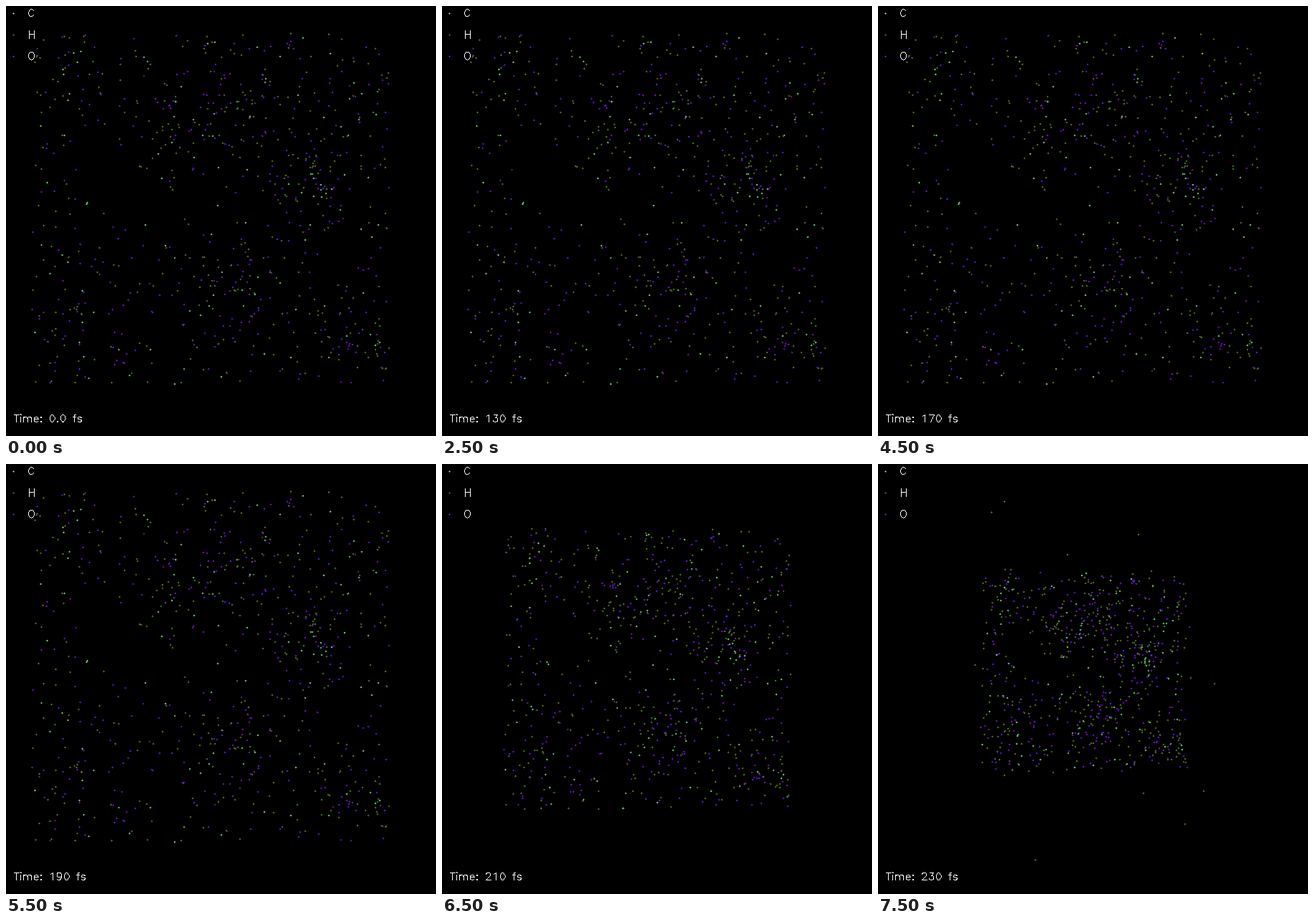
Animation of 600x600 px, one loop 8000 ms. Source, as a matplotlib script:

```python
import numpy as np
import matplotlib.pyplot as plt
from matplotlib.animation import FuncAnimation

SIZE, FRAMES, STEP = 600, 16, 500
ATOMS = 800
CENTER = np.array([293, 299])
CARBON, HYDROGEN, OXYGEN = (118, 240, 128), (96, 140, 20), (126, 24, 244)

# Motion from the 200 fs mark on; before it everything rests
FALL = 12
SCALE = (0.98, 0.80, 0.607, 0.565)
DRIFT = (0.4, 2.5, 4.5, 6)
ESCAPE = (0, 0.4, 0.95, 1)

CLUMPS = [(325, 140, 28), (210, 175, 32), (430, 245, 28), (300, 365, 40), (490, 460, 32)]
VOIDS = [(140, 220, 45), (310, 290, 38), (215, 290, 40), (220, 450, 30), (470, 345, 32)]
EXITS = [(176, 52), (158, 67), (264, 126), (363, 98), (135, 280), (469, 306),
         (454, 456), (428, 502), (370, 459), (219, 552)]

rng = np.random.default_rng(12)


def bump(p, x, y, r):
    return np.exp(-((p - (x, y)) ** 2).sum(axis=1) / (2 * r * r))


def scatter_atoms():
    """Pick points of the box by a density with clumps and voids."""
    p = rng.uniform((36, 37), (534, 528), (8000, 2))
    density = 0.8 + 1.8 * sum(bump(p, *c) for c in CLUMPS)
    for v in VOIDS:
        density *= 1 - 0.95 * bump(p, *v)
    return p[rng.choice(len(p), ATOMS, replace=False, p=density / density.sum())]


home = scatter_atoms()
wander = rng.normal(size=home.shape)
kinds = rng.choice(3, ATOMS, p=(0.14, 0.44, 0.42))
kinds[:len(EXITS)] = 1
colors = np.array([CARBON, HYDROGEN, OXYGEN])[kinds] * rng.uniform(0.85, 1, (ATOMS, 1))


def positions(k):
    if k < FALL:
        return home
    i = k - FALL
    p = CENTER + SCALE[i] * (home - CENTER) + DRIFT[i] * wander
    n = len(EXITS)
    p[:n] += ESCAPE[i] * (EXITS - p[:n])
    return p


def stamp(img, pts, rgb):
    """Put a 3 px plus with a brighter middle at every point."""
    x, y = np.rint(pts).astype(int).T
    for dx, dy in ((1, 0), (-1, 0), (0, 1), (0, -1)):
        img[y + dy, x + dx] = np.multiply(rgb, 0.7)
    img[y, x] = rgb


# Single-stroke lettering: baseline at 0, capitals 21 units high
def arc(cx, cy, rx, ry, start=0, end=360):
    t = np.radians(np.linspace(start, end, 17))
    return list(zip(cx + rx * np.cos(t), cy + ry * np.sin(t)))


def stem(x, top):
    return [(x, top), (x, 0)]


def bar(x0, x1, y):
    return [(x0, y), (x1, y)]


def dot(y, x=5):
    return arc(x, y, 1, 1)


def flip(strokes):
    return [[(20 - x, 21 - y) for x, y in s] for s in strokes]


RING = arc(10, 10.5, 7, 10.5)
BOWL = arc(10, 6.5, 7, 6.5, 85, -155)
SIX = [arc(10.5, 6.5, 6.5, 6.5), arc(11.5, 10.5, 7.5, 10.5, 50, 195)]
GLYPHS = {  # advance, strokes
    " ": (16, []),
    ".": (10, [dot(1)]),
    ":": (10, [dot(13), dot(1)]),
    "0": (20, [RING]),
    "1": (20, [[(6, 17), (11, 21)], stem(11, 21)]),
    "2": (20, [arc(10, 15, 6, 6, 170, -30) + bar(3, 17, 0)]),
    "3": (20, [bar(5, 16, 21) + BOWL]),
    "4": (20, [stem(13, 21), [(13, 21)] + bar(3, 18, 7)]),
    "5": (20, [bar(15, 5, 21) + [(4, 12)] + BOWL]),
    "6": (20, SIX),
    "7": (20, [bar(3, 17, 21) + [(7, 0)]]),
    "8": (20, [arc(10, 16.5, 5.5, 4.5), arc(10, 6, 7, 6)]),
    "9": (20, flip(SIX)),
    "C": (21, [arc(11, 10.5, 8, 10.5, 35, 325)]),
    "H": (22, [stem(4, 21), stem(18, 21), bar(4, 18, 11)]),
    "O": (22, [arc(11, 10.5, 8, 10.5)]),
    "T": (16, [stem(8, 21), bar(1, 15, 21)]),
    "i": (8, [dot(21, 4), stem(4, 14)]),
    "m": (30, [stem(4, 14)] + [arc(x, 9, 5.5, 5, 180, 0) + stem(x + 5.5, 9)
                               for x in (9.5, 20.5)]),
    "e": (18, [bar(3, 15, 8) + arc(9, 7, 6, 7, 8, 315)]),
    "f": (12, [arc(9, 17, 4, 4, 75, 180) + stem(5, 17), bar(2, 9, 14)]),
    "s": (17, [arc(8.5, 10.5, 5.5, 3.5, 10, 240) + arc(8.5, 3.5, 5.5, 3.5, 60, -170)]),
}


def write(img, text, x, y, size=0.5):
    """Draw text in white lines one pixel wide."""
    for ch in text:
        advance, strokes = GLYPHS[ch]
        for stroke in strokes:
            pts = np.floor((x, y) + size * np.multiply(stroke, (1, -1)))
            for a, b in zip(pts, pts[1:]):
                n = int(abs(b - a).max()) + 1
                px, py = np.rint(np.linspace(a, b, n)).astype(int).T
                img[py, px] = 255
                img[int(b[1]), int(b[0])] = 255
        x += size * advance


def picture(k):
    img = np.zeros((SIZE, SIZE, 3), np.uint8)
    stamp(img, positions(k), colors)
    legend = zip("CHO", ((165, 195, 165), (84, 112, 22), (72, 62, 220)))
    for row, (symbol, rgb) in enumerate(legend):
        y = 10 + 30 * row
        stamp(img, np.array([(10, y)]), rgb)
        write(img, symbol, 30, y + 5)
    time = str(80 + 10 * k) if k else "0.0"
    write(img, f"Time: {time} fs", 10.5, 580.5)
    return img


fig = plt.figure(figsize=(6, 6), dpi=100, facecolor="black")
ax = fig.add_axes([0, 0, 1, 1])
ax.axis("off")
screen = ax.imshow(picture(0), interpolation="nearest")


def update(k):
    screen.set_data(picture(k))
    return screen,


anim = FuncAnimation(fig, update, frames=FRAMES, interval=STEP, repeat=True,
                     repeat_delay=0)
plt.show()
```
